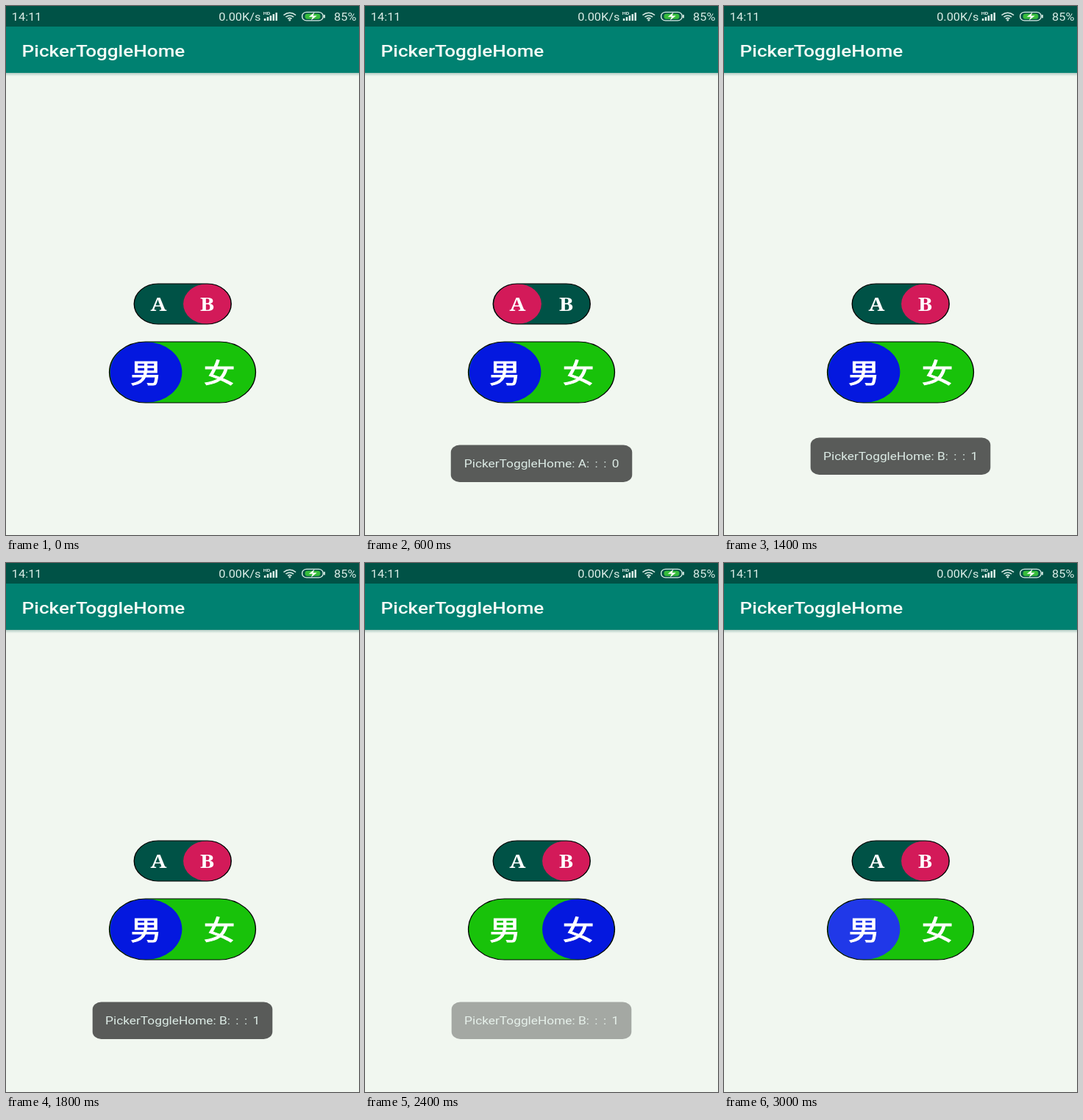
These frames come from a looping animation (480 by 720 pixels, 3.2 s). An HTML page:

```html
<!DOCTYPE html>
<html lang="en">
<head>
<meta charset="utf-8">
<title>Toggle buttons</title>
<style>
  html, body { margin: 0; width: 100%; height: 100%; overflow: hidden; background: #f1f7f0; }
  svg { display: block; width: 100vw; height: 100vh; }
  text { font-family: Roboto, "Noto Sans", sans-serif; }
  .status { font-size: 13.8px; fill: #dcede7; }
  .title { font-size: 22px; font-weight: 500; fill: #f4fbf6; }
  .letter { font: 600 24.5px "Noto Serif", serif; fill: #fff; text-anchor: middle; }
  .hanzi {
    font: 500 36px "Noto Sans CJK SC", "Noto Sans CJK", sans-serif;
    fill: #fff; stroke: #fff; stroke-width: 1; text-anchor: middle;
  }
  .toast { font-size: 14.6px; fill: #dcebe5; text-anchor: middle; }
  .count { word-spacing: 2.6px; }
  .outline { fill: none; stroke: #000; stroke-width: 1.15; }
</style>
</head>
<body>
<!-- The narrow viewBox widens the whole screen evenly. -->
<svg viewBox="0 0 405 720" preserveAspectRatio="none">
  <defs>
    <linearGradient id="shade" x2="0" y2="1">
      <stop offset="0" stop-color="#83aaa1" stop-opacity=".65"/>
      <stop offset="1" stop-color="#b5d0c8" stop-opacity="0"/>
    </linearGradient>
  </defs>
  <rect width="405" height="720" fill="#f1f7f0"/>
  <rect y="91" width="405" height="5" fill="url(#shade)"/>
  <rect y="27" width="405" height="64" fill="#008171"/>
  <rect width="405" height="28" fill="#005246"/>

  <text class="status" x="6.6" y="20">14:11</text>
  <text class="status" x="244" y="20">0.00K/s</text>
  <text class="status" x="402" y="20" text-anchor="end">85%</text>
  <text x="295" y="12.5" font-size="6" font-weight="700" fill="#dcede7">HD</text>
  <g id="bars" fill="#dcede7"></g>
  <g fill="none" stroke="#dcede7" stroke-width="1.5">
    <path d="M318.5 12.5Q325.5 6 332.5 12.5M321 15Q325.5 11 330 15M323.2 17.4Q325.5 15.3 327.8 17.4"/>
    <circle cx="325.5" cy="19.2" r=".5"/>
    <rect x="339.8" y="8.4" width="24" height="11.4" rx="5" stroke-width="1.2"/>
  </g>
  <rect x="343" y="10.4" width="17.6" height="7.4" rx="3.4" fill="#38bd3c"/>
  <path d="M354 8.6l-6.6 6.2h4.4l-1.7 4.8 6.6-6.4h-4.4z" fill="#fff"/>
  <rect x="364.6" y="11.8" width="1.5" height="4.6" rx=".7" fill="#dcede7"/>
  <text class="title" x="18.2" y="69">PickerToggleHome</text>

  <g id="toggles"></g>

  <g id="toast">
    <rect id="bubble" y="597.6" height="50.4" rx="10" fill="#595b59"/>
    <text class="toast" x="202.6" y="628.5">PickerToggleHome: <tspan id="count" class="count"></tspan></text>
  </g>
</svg>
<script>
const LOOP = 3200, STEP = 200;
const $ = id => document.getElementById(id);

function set(node, attrs) {
  for (const key in attrs) node.setAttribute(key, attrs[key]);
}

function add(parent, tag, attrs, text = "") {
  const node = document.createElementNS("http://www.w3.org/2000/svg", tag);
  set(node, attrs);
  node.textContent = text;
  return parent.appendChild(node);
}

function makeToggle({ x, y, width, height, track, thumb, labels, type, baseline }) {
  const r = height / 2;
  const box = { x, y, width, height, rx: r };
  const centers = [x + r + 0.6, x + width - r - 0.2];
  const group = $("toggles");
  add(group, "rect", { ...box, fill: track });
  const knob = add(group, "circle", { cy: y + r, r: r - 0.2, fill: thumb });
  add(group, "rect", { ...box, class: "outline" });
  labels.forEach((label, i) => add(group, "text", { class: type, x: centers[i], y: baseline }, label));
  return { knob, select: i => knob.setAttribute("cx", centers[i]) };
}

for (let i = 0; i < 5; i++) {
  const height = 3 + 2 * i;
  add($("bars"), "rect", { x: 296 + 3.3 * i, y: 20 - height, width: 2.1, height });
}

const letters = makeToggle({
  x: 147, y: 378, width: 111.4, height: 55, track: "#005246", thumb: "#d31a59",
  labels: ["A", "B"], type: "letter", baseline: 415.5
});
const genders = makeToggle({
  x: 118.6, y: 457, width: 167.8, height: 83, track: "#18c20a", thumb: "#0418df",
  labels: ["男", "女"], type: "hanzi", baseline: 513.5
});

const toasts = [
  { start: 200, text: "A: : : 0", width: 208 },
  { start: 1400, text: "B: : : 1", width: 206.4 }
];
const TOAST_LIFE = 1200;

function render(time) {
  const t = Math.floor((time % LOOP) / STEP) * STEP;
  letters.select(t >= 200 && t < 1000 ? 0 : 1);
  genders.select(t >= 2000 && t < 2800 ? 1 : 0);
  genders.knob.setAttribute("fill", t >= 2800 ? "#2038e8" : "#0418df");

  const toast = toasts.find(({ start }) => t >= start && t < start + TOAST_LIFE);
  $("toast").style.display = toast ? "" : "none";
  if (!toast) return;
  const age = t - toast.start;
  set($("toast"), {
    transform: `translate(0 ${age < STEP ? -10 : 0})`,
    opacity: age >= TOAST_LIFE - STEP ? 0.5 : 1
  });
  set($("bubble"), { x: 202.5 - toast.width / 2, width: toast.width });
  $("count").textContent = toast.text;
}

const origin = performance.now();
function tick() {
  render(performance.now() - origin);
  requestAnimationFrame(tick);
}
tick();
</script>
</body>
</html>
```
